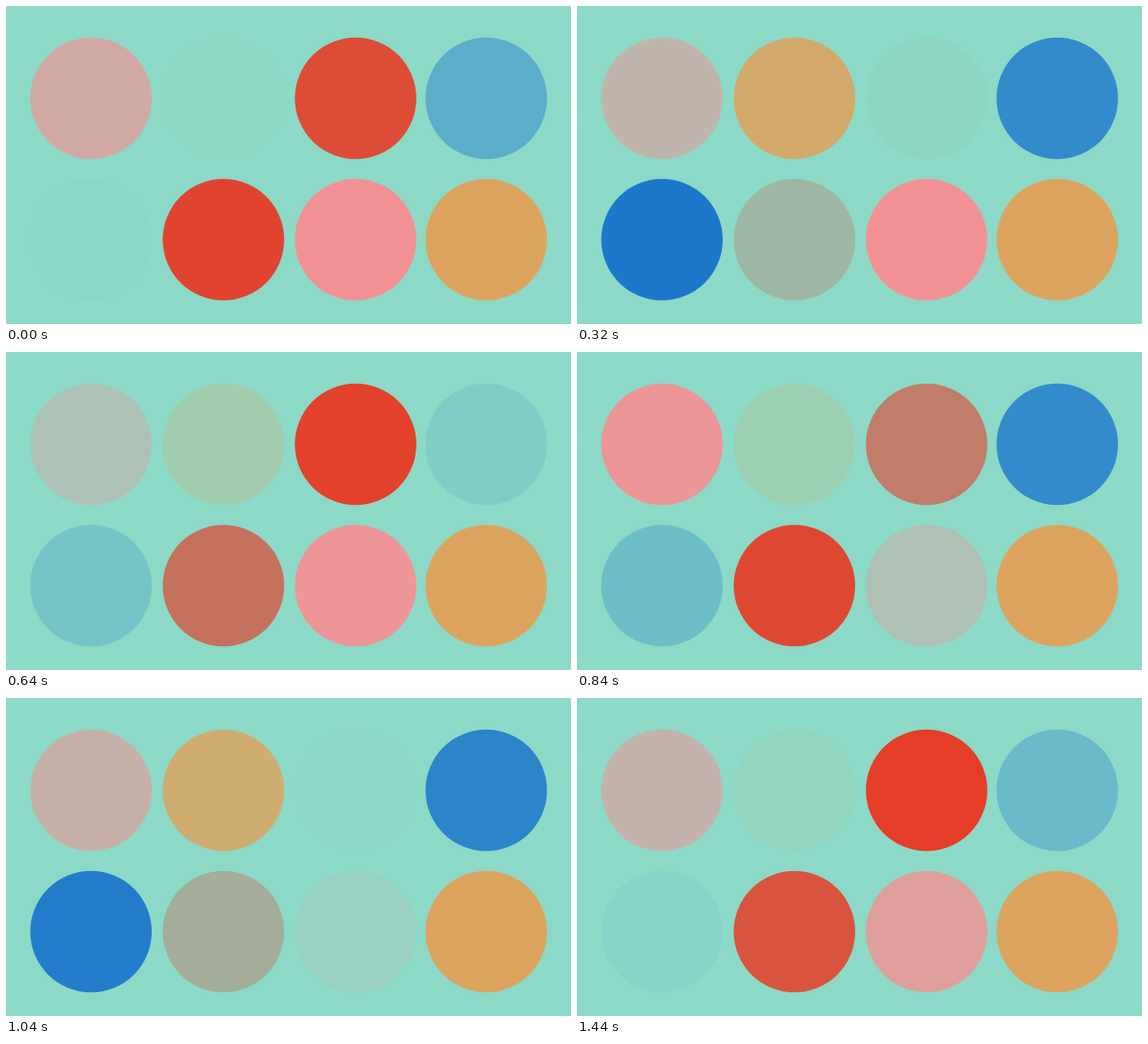
An HTML page that plays this animation: 640 by 360 pixels, repeating every 1.48 s.

```html
<!DOCTYPE html>
<html lang="en">
<head>
<meta charset="utf-8">
<title>Fading dots</title>
<style>
  html, body { margin: 0; width: 100%; height: 100%; overflow: hidden; background: #8cd9c7; }
  svg { display: block; width: 100%; height: 100%; }
  circle { filter: blur(.4px); }
</style>
</head>
<body>
<svg id="stage" viewBox="0 0 640 360"></svg>
<script>
const LOOP = 1480, STEP = 40, PULSE = LOOP / 2;
const COLS = [96.3, 246.3, 396, 544], ROWS = [104.5, 264.5], RADIUS = 68.8;
const PINK = '#f39294', ORANGE = '#dda460', RED = '#e83823', BLUE = '#1670cc';

// peak: time in ms when the dot is solid; from: it stays solid until then.
const DOTS = [
  { fill: PINK, peak: 135 },
  { fill: ORANGE, peak: 380 },
  { fill: RED, peak: 675 },
  { fill: BLUE, peak: 210 },
  { fill: BLUE, peak: 360 },
  { fill: RED, peak: 45 },
  { fill: PINK, peak: 610, from: 610 },
  { fill: ORANGE, peak: 0, from: LOOP }
];

const stage = document.getElementById('stage');

DOTS.forEach((dot, i) => {
  dot.el = document.createElementNS(stage.namespaceURI, 'circle');
  const attrs = { cx: COLS[i % 4], cy: ROWS[i >> 2], r: RADIUS, fill: dot.fill };
  for (const name in attrs) dot.el.setAttribute(name, attrs[name]);
  stage.appendChild(dot.el);
});

// A gently eased fade from solid to clear and back.
function pulse(ms) {
  const turn = ms / PULSE;
  const line = Math.abs(1 - 2 * (turn - Math.floor(turn)));
  const wave = (1 + Math.cos(2 * Math.PI * turn)) / 2;
  return (line + wave) / 2;
}

function draw(ms) {
  const t = Math.floor(ms % LOOP / STEP) * STEP;
  for (const { el, peak, from = 0 } of DOTS) {
    el.setAttribute('fill-opacity', t < from ? 1 : pulse(t - peak));
  }
}

let start;
function tick(now) {
  if (start === undefined) start = now;
  draw(Math.max(0, now - start));
  requestAnimationFrame(tick);
}

draw(0);
requestAnimationFrame(tick);
</script>
</body>
</html>
```
